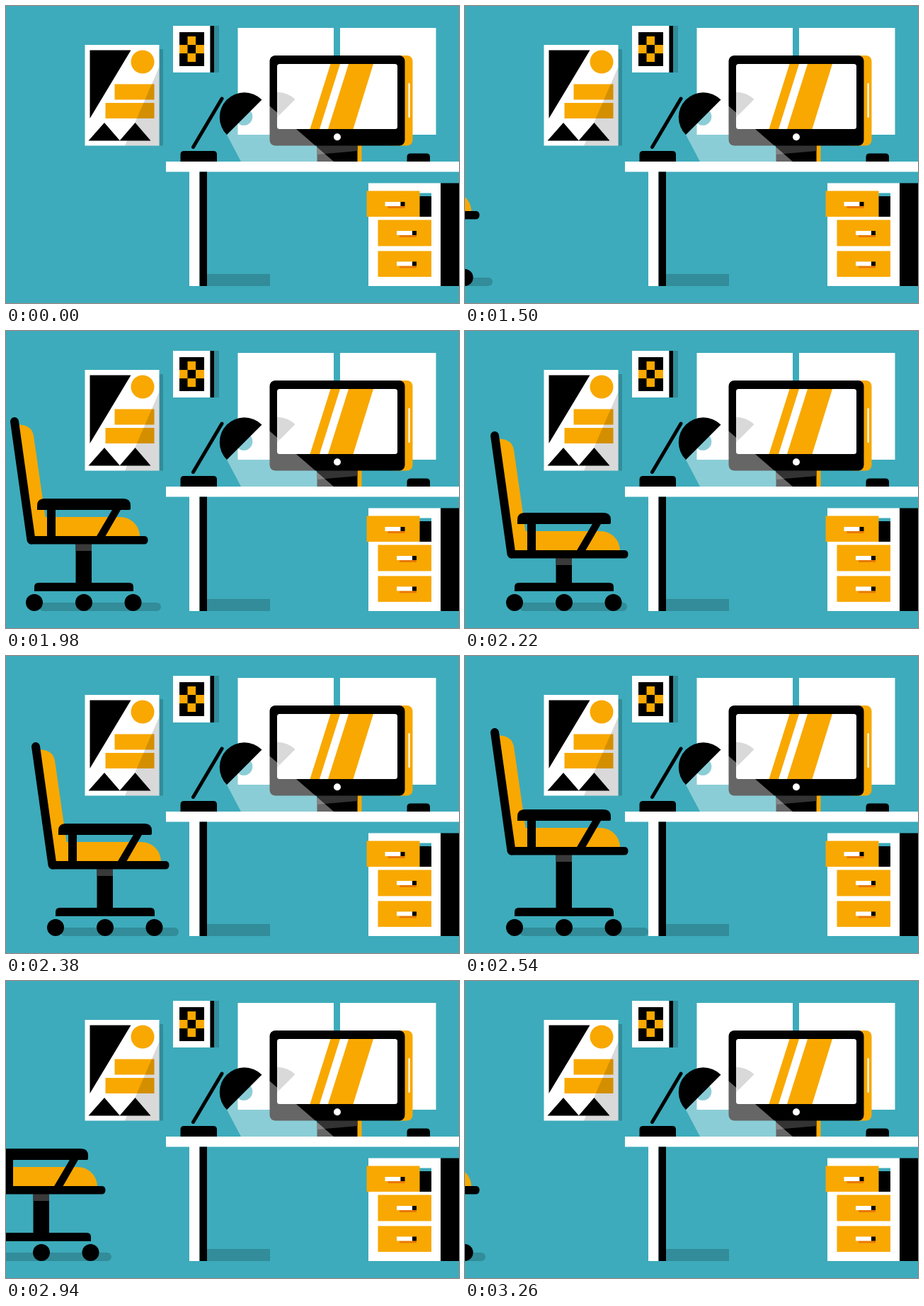
Write an HTML page that moves like this. It is 640 by 420 pixels and loops after 3.34 s.

```html
<!DOCTYPE html>
<html lang="en">
<head>
<meta charset="utf-8">
<title>Office desk</title>
<style>
  html, body { margin: 0; width: 100%; height: 100%; overflow: hidden; background: #3dabbb; }
  svg { display: block; width: 640px; height: 420px; }
  .w { fill: #fff; }
  .g { fill: #f8a800; }
  .o { fill: #e8780a; }
  .t { fill: #3dabbb; }
  .s { fill: #000; fill-opacity: .18; }
  .l { stroke: #000; stroke-linecap: round; }
</style>
</head>
<body>
<svg viewBox="0 0 640 420">
  <defs>
    <clipPath id="monitorClip"><rect x="372.5" y="70" width="191" height="127.5"/></clipPath>
    <g id="handle">
      <path class="o" d="M4 6h24v3H4z"/>
      <path class="w" d="M0 0h22v6H0z"/>
      <path d="M22 0h6v6h-6z"/>
    </g>
  </defs>

  <!-- wall -->
  <path class="w" d="M327.5 31H463V182H327.5zM472 31H607.5V182H472z"/>
  <path class="s" d="M216.5 61H222V197.5H216.5z"/>
  <path class="w" d="M111.5 55H216.5V197.5H111.5z"/>
  <path d="M118.5 62.5H176.5L118.5 159z"/>
  <circle class="g" cx="193" cy="79" r="16.5"/>
  <path class="g" d="M153.5 110.5H209.5V132.5H153.5zM140.5 137H209.5V159H140.5z"/>
  <path d="M116.5 190.5L139 165L161 190.5zM160.5 190.5L182.5 165L204.5 190.5z"/>
  <path d="M216.5 86V197.5H168z" fill-opacity=".15"/>
  <path class="s" d="M294 28H301V94H294z"/>
  <path class="w" d="M236 28H288.5V94H236z"/>
  <path d="M288.5 28H294V94H288.5zM245 37H280V85H245z"/>
  <path class="g" d="M256.5 43H268V55H256.5zM245 55H256.5V67H245zM268 55H280V67H268zM256.5 67H268V79H256.5z"/>

  <!-- chair -->
  <g id="chair">
    <rect id="shadow" class="s" x="77" y="384" width="152" height="12" rx="6"/>
    <path id="post"/>
    <path d="M70 368V362Q70 356 76 356H204Q210 356 210 362V368z"/>
    <circle cx="70" cy="384" r="12"/>
    <circle cx="140" cy="384" r="12"/>
    <circle cx="209.5" cy="384" r="12"/>
    <g id="seat">
      <path fill="#3a3a3a" d="M128.5 321H151V331H128.5z"/>
      <path class="g" d="M48 152.5Q66 152.5 69 168L85.5 283H190C208 283 219 296 219 311H68z"/>
      <path class="l" fill="none" stroke-width="12" d="M42 148L65.5 315.5"/>
      <path d="M62 310H225Q230.5 310 230.5 315.7T225 321.5H65z"/>
      <path d="M74 273V267Q74 257 84 257H196Q206 257 206 267V271Q206 273 204 273z"/>
      <path d="M88 272H100V311H88zM180.5 272H192.5L170 311H157.5z"/>
    </g>
  </g>

  <!-- monitor -->
  <rect class="g" x="540" y="70" width="34.5" height="127.5" rx="8"/>
  <rect class="w" x="568.5" y="109" width="2.2" height="49" rx="1"/>
  <path class="g" d="M496 197H502.5V220H496z"/>
  <path d="M439.5 196H496.5V220H439.5z"/>
  <path fill="#333" d="M439.5 197H496.5V205L439.5 210z"/>
  <rect x="372.5" y="70" width="191" height="127.5" rx="8"/>
  <rect class="w" x="383" y="82" width="170" height="92" rx="3.5"/>
  <path class="g" d="M458.5 82H472L443 174H429.5zM484 82H519L490.5 174H455z"/>
  <circle class="w" cx="468" cy="185.3" r="5"/>
  <path clip-path="url(#monitorClip)" fill-opacity=".15" d="M408.5 132A35 35 0 0 0 359 182z"/>

  <!-- lamp -->
  <circle class="t" cx="336" cy="156.5" r="12.3"/>
  <path class="w" fill-opacity=".4" d="M312 182L361.5 132L463 220H332z"/>
  <path d="M361.5 132.5A35 35 0 1 0 312 182z"/>
  <path class="l" stroke-width="5" d="M264.5 199.5L305 131"/>
  <path d="M246.5 220V210Q246.5 205 251.5 205H293Q298 205 298 210V220z"/>
  <path d="M566.5 220V213.5Q566.5 208.500 571.5 208.500H594Q599 208.500 599 213.500V220z"/>

  <!-- desk -->
  <path class="s" d="M284 379H373V396H284z"/>
  <path class="w" d="M226 220H640V234.500H226zM259 234H273.500V396H259z"/>
  <path d="M273.500 234.500H284V396H273.500z"/>
  <path class="w" d="M512 250.500H614V396H512z"/>
  <path d="M614 250.500H640V396H614z"/>
  <path class="t" d="M584 264.500H601V269H584z"/>
  <path d="M584 269H601V298H584z"/>
  <path class="g" d="M509.500 261.500H584.500V298H509.500zM525.500 302.500H601V339.500H525.500zM525.500 346.500H601V383H525.500z"/>
  <use href="#handle" x="535.5" y="277"/>
  <use href="#handle" x="552" y="318"/>
  <use href="#handle" x="552" y="361.5"/>
</svg>
<script>
  const LOOP = 3340, START = 1500, STEP = 80;

  // step, roll, seat lift, right end of the shadow
  const KEYS = [
    [0, -210, -20, 249],
    [7, 0, -20, 249],
    [9, 0, 0, 229],
    [13, 0, -40, 259],
    [15, 0, -20, 239],
    [22, -210, -20, 239]
  ];

  const [chair, seat, post, shadow] =
    ['chair', 'seat', 'post', 'shadow'].map(id => document.getElementById(id));

  function poseAt(step) {
    const i = Math.max(1, KEYS.findIndex(key => key[0] >= step));
    const a = KEYS[i - 1], b = KEYS[i];
    const p = (step - a[0]) / (b[0] - a[0]);
    return a.map((v, n) => v + (b[n] - v) * p);
  }

  function draw(now) {
    const step = Math.floor((now % LOOP - START) / STEP);
    chair.style.display = step < 0 ? 'none' : '';
    if (step >= 0) {
      const [, roll, lift, end] = poseAt(Math.min(step, 22));
      chair.setAttribute('transform', `translate(${roll} 0)`);
      seat.setAttribute('transform', `translate(0 ${lift})`);
      post.setAttribute('d', `M128.5 ${320 + lift}H151V357H128.5z`);
      shadow.setAttribute('width', end - 77);
    }
  }

  const origin = performance.now();
  function tick() {
    draw(performance.now() - origin);
    requestAnimationFrame(tick);
  }
  tick();
</script>
</body>
</html>
```
